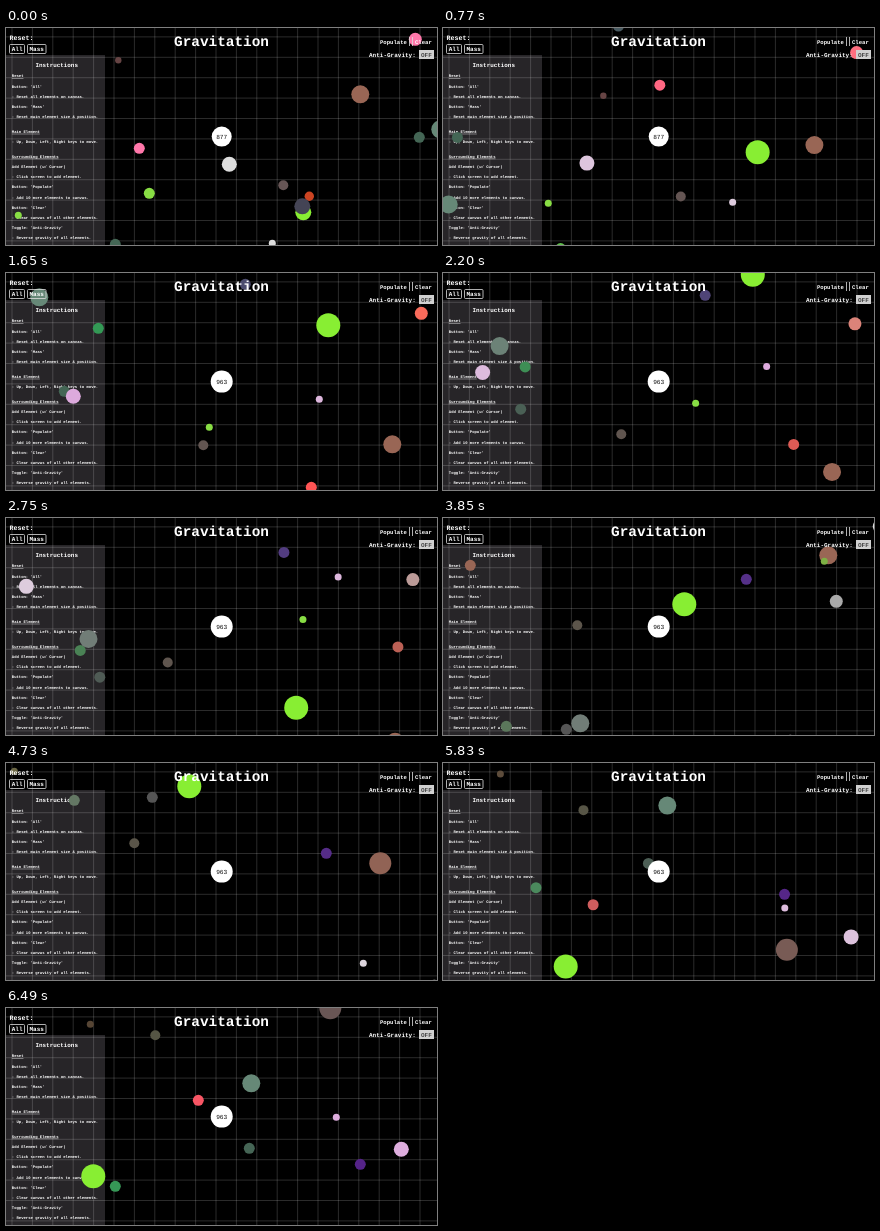
These frames come from a looping animation (431x217 px, 6.6 s). An HTML page:

```html
<!DOCTYPE html>
<html lang="en">
<head>
<meta charset="utf-8">
<title>Gravitation</title>
<style>
html, body { margin: 0; width: 100%; height: 100%; overflow: hidden; background: #000; }
svg { display: block; width: 431px; height: 217px; }
text {
  font-family: "Liberation Mono", "Courier New", monospace;
  font-weight: bold; fill: #fff; white-space: pre;
  text-rendering: geometricPrecision;
}
.u { text-decoration: underline; }
.box { fill: none; stroke: #ddd; stroke-width: .8; }
</style>
</head>
<body>
<svg viewBox="0 0 431 217" xmlns="http://www.w3.org/2000/svg">
  <rect width="431" height="217" fill="#000"/>
  <rect y="27" width="99" height="190" fill="#272528"/>
  <path id="grid" stroke="#fff" stroke-opacity=".17" fill="none"/>
  <g id="help"></g>
  <g id="balls"></g>
  <circle id="main" cx="215.7" cy="108.6" fill="#fff"/>
  <text id="mass" x="215.7" y="110.8" text-anchor="middle" style="font-size:6.2px;font-weight:normal;fill:#111"></text>
  <rect class="box" x="3.5" y="16.5" width="15" height="9" rx="1"/>
  <rect class="box" x="21.5" y="16.5" width="18.5" height="9" rx="1"/>
  <path class="box" d="M403.5 9v9M406.5 9v9"/>
  <rect x="413" y="22" width="15" height="9" fill="#d0d0d0"/>
  <g id="labels"></g>
</svg>
<script>
const W = 431, H = 217, LOOP = 6600, STEP = 110, ABSORB = 1540;
const KEYS = [0, 1650, 3850, 4730, 6490];
const $ = id => document.getElementById(id);

function add(parent, tag, attrs, text) {
  const el = document.createElementNS('http://www.w3.org/2000/svg', tag);
  for (const k in attrs) el.setAttribute(k, attrs[k]);
  if (text) el.textContent = text;
  return $(parent).appendChild(el);
}

const label = (parent, x, y, size, text, cls = '', fill = '#fff') =>
  add(parent, 'text', { x, y, class: cls, style: `font-size:${size}px;fill:${fill}` }, text);

let grid = '';
for (let x = 6; x < W; x += 20.4) grid += `M${x} 0V${H}`;
for (let y = 8.9; y < H; y += 20.4) grid += `M0 ${y}H${W}`;
$('grid').setAttribute('d', grid);

label('labels', 168, 18.2, 14.4, 'Gravitation');
label('labels', 3.5, 12, 6.7, 'Reset:');
label('labels', 5.7, 23, 6, 'All');
label('labels', 23.5, 23, 6, 'Mass');
label('labels', 374, 16, 5.6, 'Populate');
label('labels', 409, 16, 5.6, 'Clear');
label('labels', 363, 28.5, 6, 'Anti-Gravity:');
label('labels', 415, 28.7, 6, 'OFF', '', '#444');
label('help', 29.5, 38.8, 5.9, 'Instructions');

// '_' marks a heading
const HELP = `_Reset
Button: 'All'
- Reset all elements on canvas.
Button: 'Mass'
- Reset main element size & position.
_Main Element
- Up, Down, Left, Right keys to move.
_Surrounding Elements
Add Element (w/ Cursor)
- Click screen to add element.
Button: 'Populate'
- Add 10 more elements to canvas.
Button: 'Clear'
- Clear canvas of all other elements.
Toggle: 'Anti-Gravity'
- Reverse gravity of all elements.`;
let lineY = 34.6;
for (const s of HELP.split('\n')) {
  const head = s[0] === '_';
  lineY += head ? 14.7 : 10.2;
  label('help', 5.8, lineY, 3.9, s.replace('_', ''), head ? 'u' : '');
}

// Smooth curve through key points at uneven times
function curve(vs, t) {
  const n = vs.length - 1;
  let i = 0;
  while (i < n - 1 && t >= KEYS[i + 1]) i++;
  const slope = k => {
    const a = Math.max(0, k - 1), b = Math.min(n, k + 1);
    return (vs[b] - vs[a]) / (KEYS[b] - KEYS[a]);
  };
  const d = KEYS[i + 1] - KEYS[i], u = (t - KEYS[i]) / d, v = 1 - u;
  return v * v * (1 + 2 * u) * vs[i] + u * u * (3 - 2 * u) * vs[i + 1]
    + d * u * v * (v * slope(i) - u * slope(i + 1));
}

// Colour stops spread evenly over a span from 0 to 1
function tint(cols, u) {
  const p = Math.min(u, 1) * (cols.length - 1), i = Math.floor(p);
  const a = cols[i], b = cols[i + 1] || a;
  const mix = [0, 1, 2].map(k =>
    Math.round(17 * (parseInt(a[k], 16) * (1 - p + i) + parseInt(b[k], 16) * (p - i))));
  return `rgb(${mix})`;
}

const wrap = (v, size, r) => {
  const p = size + 2 * r;
  return ((v + r) % p + p) % p - r;
};

const balls = [];
// xs and ys run on past the edges and are wrapped when drawn
function ball(r, colors, xs, ys, opt = {}) {
  balls.push({
    r, xs, ys, end: LOOP, small: r, growAt: 0,
    cols: colors.split(' '), el: add('balls', 'circle', {}), ...opt
  });
}

ball(3.2, '644', [112, 215], [32, 108], { end: ABSORB });
ball(5.5, '465 538 528', [109, 239, 303, 320, 354], [-12, 11, 61, 90, 156]);
ball(5, '655 554', [277, 197, 134, 128, 149], [157, 172, 107, 80, 27]);
ball(5.5, '8d4 395 575 676 395', [143, 92, 63, 68, 109], [-63, 55, 208, 265, 406]);
ball(5.5, '465 465 555 555 465', [-29, 58, 123, 146, 243], [109, 118, 211, 262, 368]);
ball(5.5, 'f7a f55 965 965 f56', [133, 305, 469, 522, 634], [120, -14, -181, -234, -364]);
ball(3.5, 'ddd dad ddd dad', [266, 313, 347, 357, 330], [215, 126, -4, -24, -115]);
ball(6.5, 'f7a f65 aaa aaa', [409, 415, 393, 374], [11, 40, 83, 100], { end: 4620 });
ball(7.5, 'ddd dad ddd ddd dad', [223, 67, -9, -18, -51], [136, 123, 8, -8, -91]);
ball(9, '687 687 777 687 687', [-15, 33, 137, 186, 245], [-134, 24, 205, 226, 310]);
ball(11, '965 965 965 655', [354, 386, 385, 374, 324], [66, 171, 276, 339, 478],
  { small: 9, growAt: 4620 });
ball(3.5, '8d4 8d4 8d4 654 543', [12, 203, 381, 446, 522], [187, 154, 43, 8, 16]);
ball(4.7, 'c42', [303, 322], [168, 52], { end: 330 });
ball(12, '8e3', [297, 322, 241, 183, 87], [184, 52, -155, -218, -314],
  { small: 8, growAt: 330 });
ball(8, '445', [296, 322], [178, 52], { end: 330 });

function draw(t) {
  for (const b of balls) {
    const on = t < b.end;
    b.el.setAttribute('visibility', on ? 'visible' : 'hidden');
    if (!on) continue;
    b.el.setAttribute('cx', wrap(curve(b.xs, t) + .3, W, b.r).toFixed(2));
    b.el.setAttribute('cy', wrap(curve(b.ys, t) + .3, H, b.r).toFixed(2));
    b.el.setAttribute('r', t < b.growAt ? b.small : b.r);
    b.el.setAttribute('fill', tint(b.cols, t / b.end));
  }
  const merged = t >= ABSORB;
  $('main').setAttribute('r', merged ? 11 : 10);
  $('mass').textContent = merged ? '963' : '877';
}

const start = performance.now();
function tick() {
  const t = (performance.now() - start) % LOOP;
  draw(Math.floor(t / STEP) * STEP);
  requestAnimationFrame(tick);
}
tick();
</script>
</body>
</html>
```
